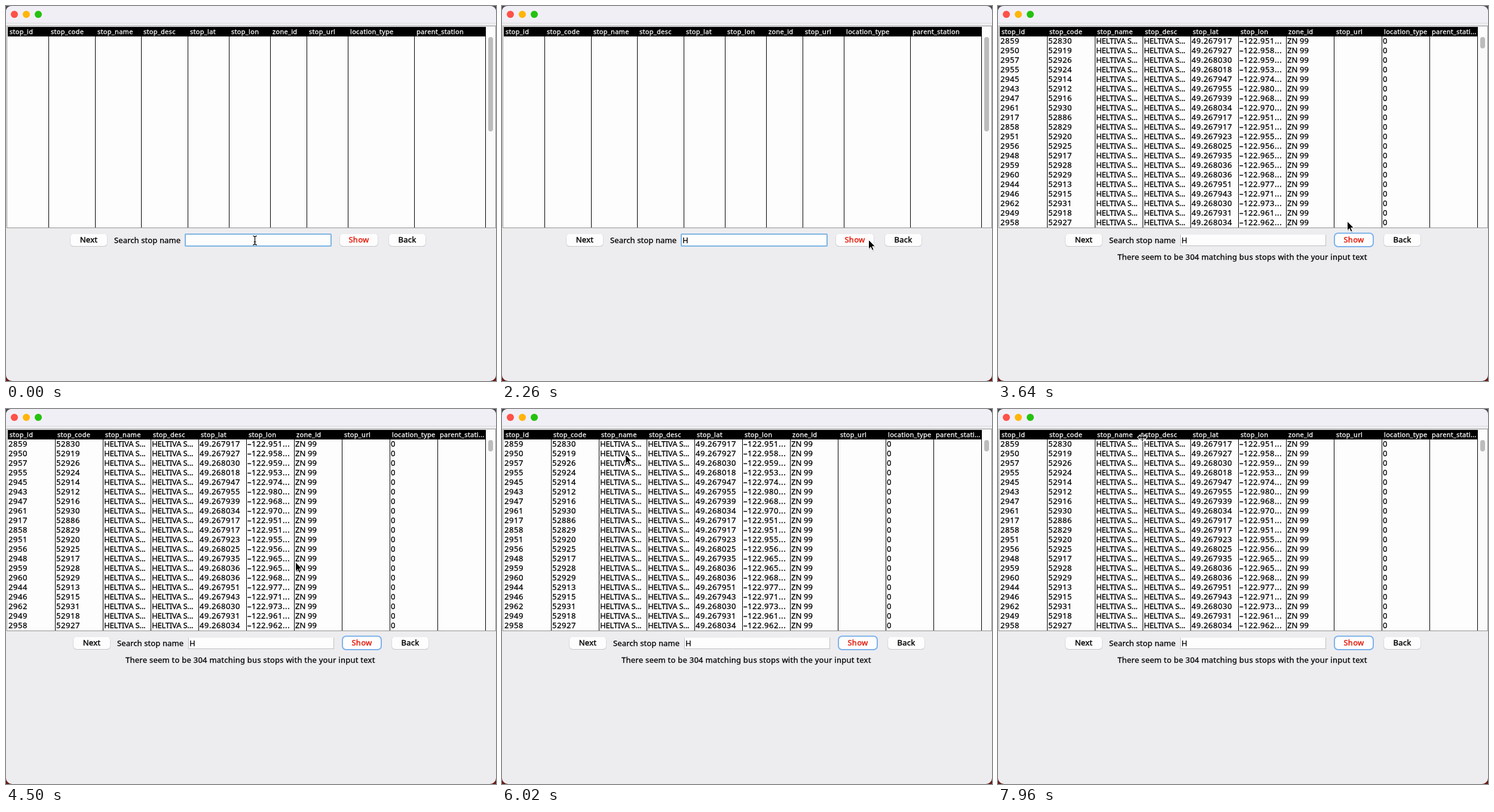
Animation, 820 px wide and 628 px high, one loop 8000 ms. Source, as an HTML page:

```html
<!DOCTYPE html>
<html lang="en">
<head>
<meta charset="utf-8">
<title>Stop search</title>
<style>
  html, body { margin: 0; width: 100%; height: 100%; overflow: hidden; background: #ededf0; }
  svg { display: block; width: 820px; height: 628px; font-family: "Noto Sans", "Open Sans", sans-serif; }
  text { white-space: pre; font-size: 13px; fill: currentColor; stroke: currentColor; stroke-width: .3px; }
  .head { font-size: 11px; color: #fff; letter-spacing: .3px; }
  .num { letter-spacing: .56px; }
  .name { letter-spacing: -.2px; }
  .label { letter-spacing: .1px; }
  .note { letter-spacing: .25px; }
  .btn { letter-spacing: .3px; stroke-width: .45px; text-anchor: middle; }
</style>
</head>
<body>
<svg id="stage" viewBox="0 0 820 628" xmlns="http://www.w3.org/2000/svg">
  <defs>
    <linearGradient id="desk" x2="0" y2="1">
      <stop offset="0" stop-color="#4a4854"/><stop offset="1" stop-color="#641a16"/>
    </linearGradient>
    <linearGradient id="blue" x2="0" y2="1">
      <stop offset="0" stop-color="#1a7cc4"/><stop offset="1" stop-color="#0761ad"/>
    </linearGradient>
  </defs>
</svg>
<script>
const NS = 'http://www.w3.org/2000/svg';
const stage = document.getElementById('stage');
const LOOP = 8000;

function add(parent, tag, attrs = {}, content) {
  const el = document.createElementNS(NS, tag);
  for (const key in attrs) el.setAttribute(key, attrs[key]);
  if (content !== undefined) el.textContent = content;
  return parent.appendChild(el);
}
const group = parent => add(parent, 'g');
const rect = (p, x, y, width, height, fill, more) =>
  add(p, 'rect', { x, y, width, height, fill, ...more });
const text = (p, x, y, str, cls, more) => add(p, 'text', { x, y, class: cls, ...more }, str);
const show = (el, on) => el.setAttribute('visibility', on ? 'visible' : 'hidden');

// Window
rect(stage, 0, 0, 820, 628, 'url(#desk)');
rect(stage, 0, 0, 820, 628, '#ededf0', { rx: 10 });
add(stage, 'path', { d: 'M0 28V10Q0 0 10 0H810Q820 0 820 10V28Z', fill: '#f1eff6' });
rect(stage, 0, 28, 820, 1, '#dddce0');
['#ff5049', '#ffb50a', '#24c20e'].forEach((fill, i) =>
  add(stage, 'circle', { cx: 14 + 20 * i, cy: 14, r: 6, fill }));

// Scroll pane
rect(stage, 1, 33, 819, 339, '#929294');
rect(stage, 2, 34, 817, 337, '#fdfdfe');
rect(stage, 803, 51, 16, 320, '#fafafb');
rect(stage, 3, 35, 800, 16, '#000');

const TITLES = ['stop_id', 'stop_code', 'stop_name', 'stop_desc', 'stop_lat', 'stop_lon',
  'zone_id', 'stop_url', 'location_type', 'parent_station'];

function table(edges, thumb, titles) {
  const g = group(stage);
  titles.forEach((title, i) => {
    text(g, i ? edges[i - 1] + 4 : 6, 47, title, 'head');
    rect(g, edges[i], 51, 1, 320, '#000');
  });
  rect(g, 807, 52, 8, thumb, '#bcbcbc', { rx: 4 });
  return g;
}

const empty = table([71, 149, 226, 304, 373, 442, 503, 572, 683, 802], 158, TITLES);
const full = table(TITLES.map((_, i) => 82 + 80 * i), 19,
  [...TITLES.slice(0, 9), 'parent_stati...']);

// Stops run east along one side of the street, then back west along the other
function position(id) {
  const back = id > 2952;
  const k = back ? id - 2955 : id < 2943 ? 9.5 : id - 2943;
  const lat = back ? 8018 + 8 * k - .9 * k * k : 7955 - 4 * k;
  const lon = back ? 953 + 2.9 * k : 980 - 3.1 * k;
  return [`49.26${Math.round(lat)}`, `–122.${Math.round(lon)}...`];
}

const IDS = '2859 2950 2957 2955 2945 2943 2947 2961 2917 2858 ' +
  '2951 2956 2948 2959 2960 2944 2946 2962 2949 2958';
const STREET = 'HELTIVA S...';

IDS.split(' ').map(Number).forEach((id, row) => {
  const code = id + (id < 2900 ? 49971 : 49969);
  const cells = [id, code, STREET, STREET, ...position(id), 'ZN 99', '', '0'];
  cells.forEach((cell, col) => {
    const cls = cell === STREET ? 'name' : col === 6 ? 'label' : 'num';
    text(full, 4 + 80 * col, 63 + 16 * row, cell, cls);
  });
});
text(full, 200, 425, 'There seem to be 304 matching bus stops with the your input text', 'note');

// Form
const form = group(stage);

function button(x, width, str, color = '#000') {
  rect(form, x - .5, 381.5, width + 1, 21.5, '#c8c8cb', { rx: 5.5 });
  const ring = rect(form, x - 2, 379.5, width + 4, 24.5, '#7db2ea', { rx: 7 });
  const face = rect(form, x, 381.5, width, 20.5, '#fdfdfe', { rx: 5 });
  const label = text(form, x + width / 2, 396, str, 'btn', { color });
  show(ring, false);
  return { ring, face, label };
}

button(108, 61, 'Next');
text(form, 181, 397, 'Search stop name', 'label');
rect(form, 300, 383, 244, 19, '#c0c0c4');
const fieldRing = rect(form, 299, 381, 246, 22, '#7db5e2', { rx: 2 });
rect(form, 301, 383, 242, 18, '#fdfdfe');
const typed = text(form, 302, 397, 'H', 'label');
const caret = rect(form, 302, 385, 1, 15, '#000');
const showBtn = button(559, 63, 'Show', '#e3200e');
button(641, 61, 'Back');

// Pointers, each drawn around its hot spot
const beam = group(stage);
add(beam, 'path', {
  d: 'M-3.5 -7.5Q-.5 -7.5 0 -5.5Q.5 -7.5 3.5 -7.5M0 -6V6M-3.5 7.5Q-.5 7.5 0 5.5Q.5 7.5 3.5 7.5M-2 2.5H2',
  fill: 'none', stroke: '#000', 'stroke-width': 1.2
});
const arrow = group(stage);
const ARROW = 'M0 0V15.5L3.6 12.2L6 17.6L8.6 16.5L6.2 11.2H11Z';
add(arrow, 'path', { d: ARROW, transform: 'translate(.6 1.4)', opacity: .22 });
add(arrow, 'path', { d: ARROW, stroke: '#fff', 'stroke-linejoin': 'round' });
const resize = group(stage);
add(resize, 'path', {
  d: 'M-8 0L-3.5 -4.5V-1.5H-1.2V-7H1.2V-1.5H3.5V-4.5L8 0L3.5 4.5V1.5H1.2V7H-1.2V1.5H-3.5V4.5Z',
  stroke: '#fff', 'stroke-width': 1.1, 'stroke-linejoin': 'round'
});

// Pointer moves: start, end, x, y
const MOVES = [
  [1120, 1540, 641, 392],
  [1960, 2260, 613, 391],
  [3500, 4500, 485, 256],
  [4500, 5440, 145, 108],
  [5440, 6740, 241, 57],
  [6840, 7100, 241, 47]
];
const easeOut = k => 1 - (1 - k) ** 1.7;

function pointAt(t) {
  let x = 416, y = 392;
  for (const [start, end, toX, toY] of MOVES) {
    const k = easeOut(Math.min(1, Math.max(0, (t - start) / (end - start))));
    x += (toX - x) * k;
    y += (toY - y) * k;
  }
  return [Math.round(x) + .5, Math.round(y) + .5];
}

function draw(now) {
  const t = now % LOOP;
  const hasText = t >= 680, clicked = t >= 2520, loaded = t >= 3500;
  const pressed = clicked && !loaded;

  show(empty, !loaded);
  show(full, loaded);
  form.setAttribute('transform', `translate(${loaded ? 5 : 0} 0)`);

  show(fieldRing, !clicked);
  show(typed, hasText);
  show(caret, t >= 420 && t < 2000);
  caret.setAttribute('x', hasText ? 312 : 302);

  show(showBtn.ring, clicked);
  showBtn.face.setAttribute('fill', pressed ? 'url(#blue)' : '#fdfdfe');
  showBtn.label.setAttribute('color', pressed ? '#c0182c' : '#e3200e');

  const [x, y] = pointAt(t);
  const kind = t < 2000 && x < 545 ? beam : t >= 6940 ? resize : arrow;
  for (const pointer of [beam, arrow, resize]) show(pointer, pointer === kind);
  kind.setAttribute('transform', `translate(${x} ${y})`);
}

function tick() {
  draw(performance.now());
  requestAnimationFrame(tick);
}
tick();
</script>
</body>
</html>
```
